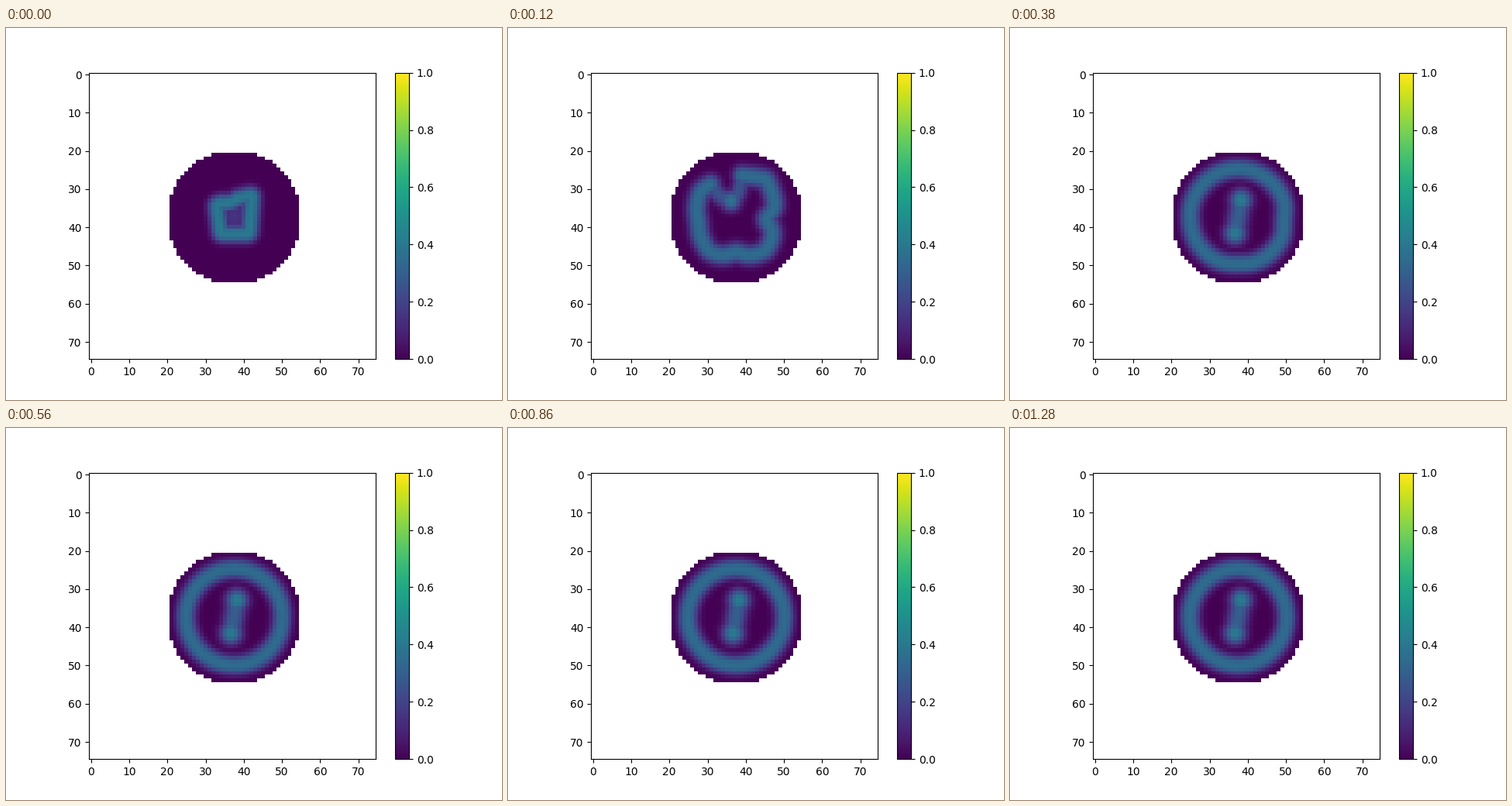
These frames come from a looping animation (640x480 px, 1320 ms). A matplotlib script:

```python
import numpy as np
import matplotlib.pyplot as plt
from matplotlib.animation import FuncAnimation

SIZE = 75
FRAMES, STEP = 66, 20
CENTRE = np.array([37.5, 37.4])
WALL = 12.6                      # radius where the front comes to rest
GAP = np.radians(255)            # direction in which the front breaks open
REST = np.array([36.4, 34.5])    # where the loose core stops
SPOTS = np.array([[38.2, 33.0], [36.7, 41.6]])

# Edges of the growing shape: direction, distance, depth of the dent left at the wall
EDGES = [(4, 7.3, 4.3), (90, 7.6, 2.4), (172, 7.1, 0.8), (255, 7.6, 0)]

yy, xx = np.mgrid[:SIZE, :SIZE]
disk = np.hypot(xx - 37.5, yy - 37.5) < 17.5
cells = np.column_stack([xx[disk], yy[disk]]).astype(float)


def mix(a, b, u):
    return a + (b - a) * u


def ramp(t, start, end):
    return min(max((t - start) / (end - start), 0), 1)


def ease_out(u):
    return 1 - (1 - u) ** 2


def polar(angle, radius):
    return CENTRE + np.column_stack([np.cos(angle), np.sin(angle)]) * np.reshape(radius, (-1, 1))


def quad(angle, sharp=16):
    """Radius of a four-sided shape with rounded corners."""
    total = sum((np.maximum(np.cos(angle - np.radians(turn)), 0) / dist) ** sharp
                for turn, dist, _ in EDGES)
    return total ** (-1 / sharp)


def dented(angle, amount):
    """Radius of the wall circle, pushed in where the edges lag behind."""
    radius = np.full_like(angle, WALL)
    for turn, _, depth in EDGES:
        off = np.angle(np.exp(1j * (angle - np.radians(turn))))
        radius -= amount * depth * np.exp(-(off / np.radians(15)) ** 2)
    return radius


def front(t):
    half = np.radians(mix(25, 20.5, ramp(t, 60, 220))) * (1 - ramp(t, 220, 320))
    angle = np.linspace(GAP + half, GAP + 2 * np.pi - half, 200)
    grown = quad(angle) * mix(0.59, 1, ramp(t, 0, 60))
    relax = np.exp(-max(t - 220, 0) / 85)
    return polar(angle, mix(grown, dented(angle, relax), ease_out(ramp(t, 60, 220))))


def core(t):
    """Two spots that coincide until the core is stretched."""
    edge = 0.9 * quad(np.array([GAP])) * mix(0.59, 1, ramp(t, 0, 60))
    loose = mix(polar(np.array([GAP]), edge)[0], REST, ease_out(ramp(t, 60, 220)))
    return mix(loose, SPOTS, ease_out(ramp(t, 220, 380)))


def bend(a, mid, b):
    """Samples of a parabola through three points."""
    u = np.linspace(0, 1, 24)[:, None]
    return mix(a, b, u) + 4 * u * (1 - u) * (mid - (a + b) / 2)


def glow(pts, level, width):
    gap = cells[:, None] - np.atleast_2d(pts)[None]
    dist = np.sqrt((gap ** 2).sum(axis=2).min(axis=1))
    return level * np.exp(-(dist / width) ** 2.5)


def field(t):
    line, spots = front(t), core(t)
    level = mix(0.40, 0.35, ramp(t, 0, 60))
    width = mix(2.3, 2.55, ramp(t, 0, 60))
    stretch = ramp(t, 220, 380)
    tip = 0.06 * np.sin(np.pi * ramp(t, 120, 320))
    link = 1 - ramp(t, 90, 200)
    fill = 1 - ramp(t, 0, 50)

    layers = [
        glow(line, level, width),
        glow(line[[0, -1]], level + tip, width),
        glow(spots, mix(0.36, 0.41, ramp(t, 60, 220)), mix(width, 3.0, ramp(t, 60, 220))),
        glow(np.linspace(*spots, 16), mix(0.36, 0.30, stretch), mix(width, 2.8, stretch)),
        glow(bend(line[0], spots[0], line[-1]), level * link, width * mix(0.6, 1, link)),
        glow(CENTRE, 0.15 * fill, 4.5),
    ]
    return np.max(layers, axis=0)


def grid(t):
    values = np.full((SIZE, SIZE), np.nan)
    values[disk] = field(t)
    return values


fig, ax = plt.subplots(figsize=(6.4, 4.8), dpi=100)
image = ax.imshow(grid(0), cmap="viridis", vmin=0, vmax=1)
fig.colorbar(image)


def draw(frame):
    image.set_data(grid(frame * STEP))
    return [image]


anim = FuncAnimation(fig, draw, frames=FRAMES, interval=STEP, repeat=True, repeat_delay=0)
plt.show()
```
